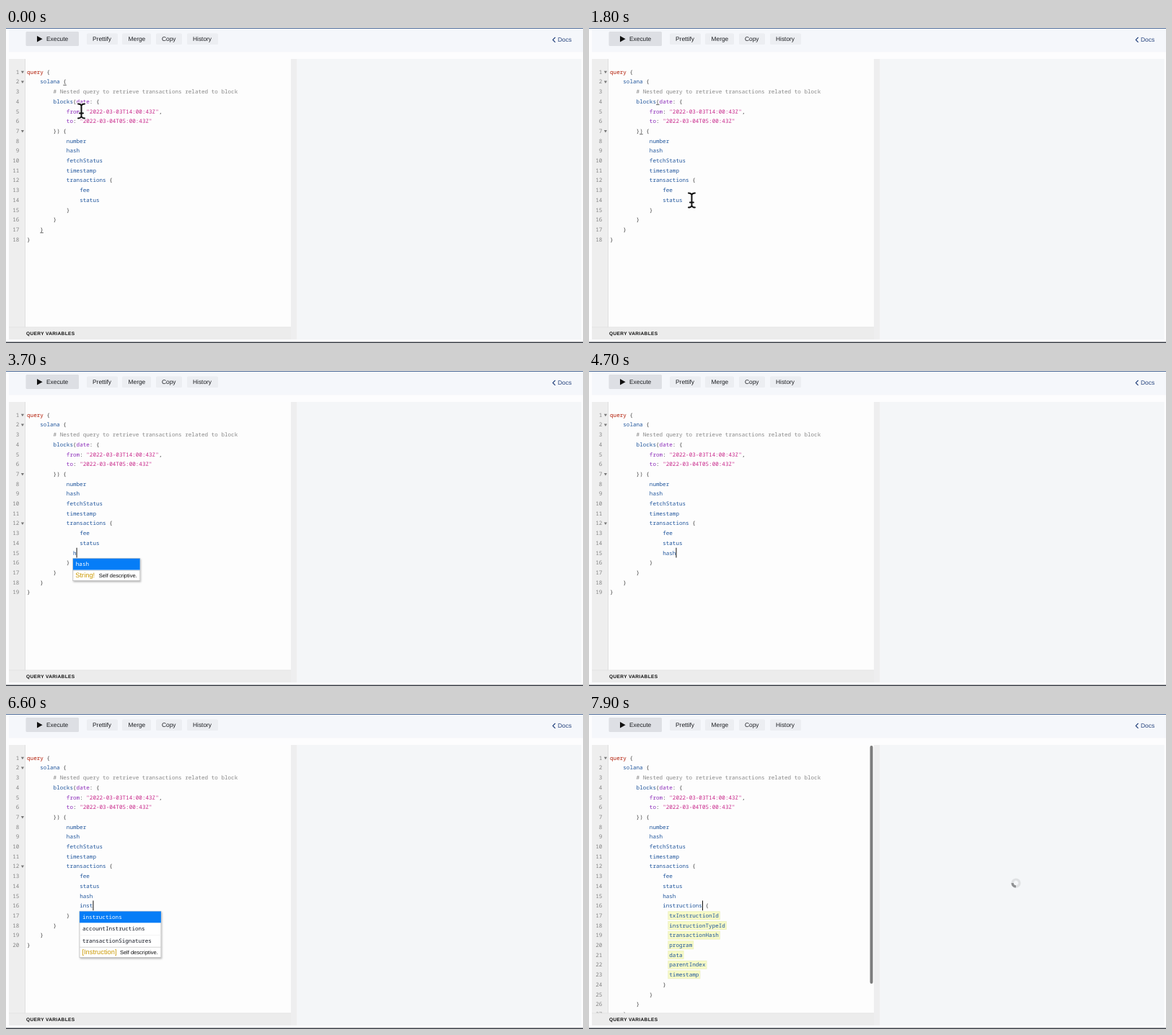
Recreate the animation shown at these times as an HTML page. Size 800 by 438 pixels, loop 8000 ms.

```html
<!DOCTYPE html>
<html lang="en">
<head>
<meta charset="utf-8">
<title>Query editor</title>
<style>
html, body { margin: 0; width: 100%; height: 100%; overflow: hidden; background: #fdfdfe; }
svg { display: block; width: 100vw; height: 100vh; text-rendering: geometricPrecision; }
.mono { font: 7.62px "Noto Sans Mono", "DejaVu Sans Mono", monospace; }
.ui { font: 8.4px "Liberation Sans", Arial, sans-serif; fill: #1c1e22; }
.title { font: bold 6.6px "Liberation Sans", Arial, sans-serif; letter-spacing: .33px; fill: #111; }
.type { font: 9.3px "Liberation Sans", Arial, sans-serif; fill: #ca9800; }
.desc { font: 7.5px "Liberation Sans", Arial, sans-serif; fill: #111; }
.key { fill: #b11a04; }
.prop { fill: #1f559c; }
.punct { fill: #444; }
.str { fill: #c8268a; }
.attr { fill: #8b2bb9; }
.note { fill: #888; }
.num { fill: #858585; text-anchor: end; }
</style>
</head>
<body>
<svg viewBox="0 0 800 438" preserveAspectRatio="none">
  <defs>
    <clipPath id="editorClip"><rect x="4" y="43" width="391" height="373"/></clipPath>
    <filter id="shadow" x="-10%" y="-10%" width="120%" height="125%">
      <feDropShadow dx="1" dy="1.5" stdDeviation="1.2" flood-opacity=".28"/>
    </filter>
  </defs>
  <rect width="800" height="438" fill="#fdfdfe"/>
  <rect x="4" y="1" width="796" height="32.5" fill="#f5f7fb"/>
  <rect width="800" height="1" fill="#53709b"/>
  <g id="bar"></g>
  <path d="M48 0 " fill="none"/>
  <path d="M43 11v8.4l7.6-4.2z" fill="#111"/>
  <path d="M761.5 13l-3.3 3.4 3.3 3.4" fill="none" stroke="#24427c" stroke-width="1.2"/>
  <text class="ui" x="765" y="19.2" style="fill:#24427c">Docs</text>

  <rect x="4" y="43" width="22.5" height="373" fill="#eeeeee"/>
  <rect x="26" y="43" width="1" height="373" fill="#dfdfdf"/>
  <rect x="27" y="43" width="368" height="373" fill="#fdfdfd"/>
  <rect x="395" y="43" width="8.5" height="390" fill="#eeeeef"/>
  <rect x="403.5" y="43" width="394" height="390" fill="#f4f6f8"/>

  <g id="editor" clip-path="url(#editorClip)"></g>

  <rect x="4" y="416" width="391" height="17" fill="#ececec"/>
  <rect x="4" y="415.6" width="391" height=".7" fill="#dedede"/>
  <text class="title" x="28" y="427.4">QUERY VARIABLES</text>
  <rect y="436.5" width="800" height="1.5" fill="#3c4048"/>

  <g id="popup"></g>
  <g id="spinner" fill="none" stroke-width="3.4">
    <circle r="4.9" stroke="#dfe1e3"/>
    <path d="M-3.46-3.46A4.9 4.9 0 0 1 3.46-3.46" stroke="#8f9193"/>
  </g>
  <g id="mouse" fill="none" stroke-linecap="round">
    <path id="beam" d="M-4.5-10Q-1-10 0-7.5Q1-10 4.5-10M0-7.5V7.5M-4.5 10Q-1 10 0 7.5Q1 10 4.5 10M-2.5 3H2.5"/>
  </g>
</svg>
<script>
const LOOP = 8000, STEP = 100;
const CHAR = 4.572, ROW = 13.7, LEFT = 29, TOP = 61;
const $ = id => document.getElementById(id);
const colX = c => LEFT + c * CHAR;
const rowY = r => TOP + r * ROW;
const rect = (x, y, w, h, fill, more = '') =>
  `<rect x="${x}" y="${y}" width="${w}" height="${h}" fill="${fill}" ${more}/>`;
const text = (cls, x, y, s, more = '') => `<text class="${cls}" x="${x}" y="${y}" ${more}>${s}</text>`;

// label, button left, width, text left
const buttons = [
  ['Execute', 27.5, 73.5, 56], ['Prettify', 112, 43, 120], ['Merge', 161, 40, 169.5],
  ['Copy', 208, 36, 216], ['History', 251, 43, 259]
];
$('bar').innerHTML = buttons.map(([s, x, w, tx], i) =>
  (i ? rect(x, 7.5, w, 15.5, '#eceef2', 'rx="1.5"') : rect(x, 5, w, 20, '#dddfe4', 'rx="1.5"')) +
  text('ui', tx, i ? 18.3 : 18, s)).join('');

$('mouse').innerHTML = ['#fff', '#111'].map((c, i) => {
  const p = $('beam').cloneNode();
  p.removeAttribute('id');
  p.setAttribute('stroke', c);
  p.setAttribute('stroke-width', i ? 2 : 4);
  return p.outerHTML;
}).join('');

const head = `query {
    solana {
        # Nested query to retrieve transactions related to block
        blocks(date: {
            from: "2022-03-03T14:00:43Z",
            to: "2022-03-04T05:00:43Z"
        }) {
            number
            hash
            fetchStatus
            timestamp
            transactions {
                fee
                status`.split('\n');
const tail = ['            }', '        }', '    }', '}'];
const fields = ['txInstructionId', 'instructionTypeId', 'transactionHash', 'program', 'data', 'parentIndex', 'timestamp'];

// time, row typed in, indent, word, popup open
const typing = [
  [2300, 14, 14, '', 0], [3500, 14, 14, 'h', 1], [3800, 14, 16, 'ha', 1],
  [4000, 14, 16, 'has', 1], [4200, 14, 16, 'hash', 1], [4400, 14, 16, 'hash', 0],
  [5100, 15, 14, '', 0], [5600, 15, 14, 'i', 1], [6100, 15, 14, 'in', 1],
  [6300, 15, 16, 'ins', 1], [6500, 15, 16, 'inst', 1], [6900, 15, 16, 'instructions', 0]
];
const FILL = 7500;

const hints = word => {
  if (word[0] === 'h') return { items: ['hash'], type: 'String!', w: 93 };
  const items = word.length < 3
    ? ['instructions', 'timestamp', 'transactionLogs', 'accountInstructions', 'accountTransactions', 'transactionSignatures']
    : ['instructions', 'accountInstructions', 'transactionSignatures'];
  return { items, type: '[Instruction]', w: 113, max: 107 };
};

const kinds = [
  [/^#.*/, 'note'], [/^"[^"]*"/, 'str'], [/^\w+(?=:)/, 'attr'],
  [/^query/, 'key'], [/^\w+/, 'prop'], [/^[^\s\w"#]+/, 'punct']
];
function paint(line, row) {
  let out = '', c = 0;
  while (c < line.length) {
    const rest = line.slice(c);
    const hit = kinds.find(([re]) => re.test(rest));
    if (!hit) { c++; continue; }
    const word = rest.match(hit[0])[0];
    out += text('mono ' + hit[1], colX(c), rowY(row) + 2.7, word);
    c += word.length;
  }
  return out;
}

const underline = (row, col) => rect(colX(col), rowY(row) + 4.2, CHAR, .8, '#444');
const caret = (row, col) => rect(colX(col), rowY(row) - 7, 1, ROW, '#111');

function drawEditor(t) {
  const now = typing.filter(s => t >= s[0]).pop();
  const filled = t >= FILL;
  const lines = [...head];
  if (now) {
    if (now[1] === 15) lines.push(' '.repeat(16) + 'hash');
    lines.push(' '.repeat(now[2]) + now[3] + (filled ? ' {' : ''));
  }
  let out = '';
  if (filled) {
    const glow = Math.min(1, (t - FILL + 100) / 500);
    fields.forEach((f, i) => {
      out += rect(colX(18) - 1.5, rowY(lines.length) - 5.5, f.length * CHAR + 3, 11, '#f7fac6',
        `stroke="#e9eebb" stroke-width=".7" opacity="${glow}"`);
      lines.push(' '.repeat(18) + f);
    });
    lines.push(' '.repeat(16) + '}');
  }
  lines.push(...tail);
  lines.forEach((l, i) => {
    out += text('mono num', 18.4, rowY(i) + 2.7, i + 1) + paint(l, i);
  });

  const folds = t >= 7700 ? [0] : t >= 2700 ? [0, 1, 6, 11] : [0, 1, 6];
  for (const r of folds) out += `<path d="M20.8 ${rowY(r) - 1.3}h4.2l-2.1 3.6z" fill="#777"/>`;

  if (t < 100) out += underline(1, 11) + underline(16, 4);
  else if (t >= 200 && t < 1900) out += underline(3, 14) + underline(6, 9);

  if (now) out += caret(now[1], now[2] + now[3].length);
  else if (t >= 1900) out += caret(13, 22);
  if (filled) out += rect(389.6, 44, 4, 331, '#7c7c7c', 'rx="2"');
  $('editor').innerHTML = out;
  $('popup').innerHTML = now && now[4] ? drawPopup(now) : '';
}

function drawPopup([, row, col, word]) {
  const { items, type, w, max = 200 } = hints(word);
  const x = colX(col) - .2, y = rowY(row) + 7.8, pitch = 16.6;
  const full = items.length * pitch + 14.4;
  const h = Math.min(full, max);
  const line = y + items.length * pitch;
  let out = rect(x, y, w, h, '#fff', 'stroke="#bbb" stroke-width=".8" filter="url(#shadow)"');
  out += `<clipPath id="popClip">${rect(x, y, w, h, '#000')}</clipPath><g clip-path="url(#popClip)">`;
  out += rect(x, y, w, pitch - .6, '#067df7');
  items.forEach((s, i) => {
    if (i > 1) out += rect(x, y + i * pitch - .3, w, .6, '#eee');
    out += text('mono', x + 4, y + i * pitch + 10.4, s, `fill="${i ? '#141823' : '#fff'}"`);
  });
  out += rect(x, line - .3, w, .8, '#ccc');
  out += text('type', x + 3.5, line + 10.2, type);
  out += text('desc', x + w - 57, line + 9.8, 'Self descriptive.');
  return out + '</g>';
}

// time, x, y
const path = [[0, 104.5, 115.5], [100, 104.5, 115.5], [200, 109, 116], [600, 109, 116],
  [1000, 70.5, 220], [1400, 86, 236], [1900, 149, 240], [LOOP, 149, 240]];
function mouseAt(t) {
  const i = path.findIndex(p => p[0] > t);
  const [t0, x0, y0] = path[i - 1], [t1, x1, y1] = path[i];
  const k = (t - t0) / (t1 - t0), e = k * k * (3 - 2 * k);
  return [x0 + (x1 - x0) * e, y0 + (y1 - y0) * e];
}

let last = -1;
function frame() {
  const t = Math.floor(performance.now() % LOOP / STEP) * STEP;
  if (t !== last) {
    last = t;
    drawEditor(t);
    $('mouse').setAttribute('transform', `translate(${mouseAt(t)})`);
    $('mouse').style.display = t < 2300 ? '' : 'none';
    $('spinner').setAttribute('transform', `translate(592 235) rotate(${225 + (t - 7900) * .6})`);
    $('spinner').style.display = t >= 7600 ? '' : 'none';
  }
  requestAnimationFrame(frame);
}
frame();
</script>
</body>
</html>
```
